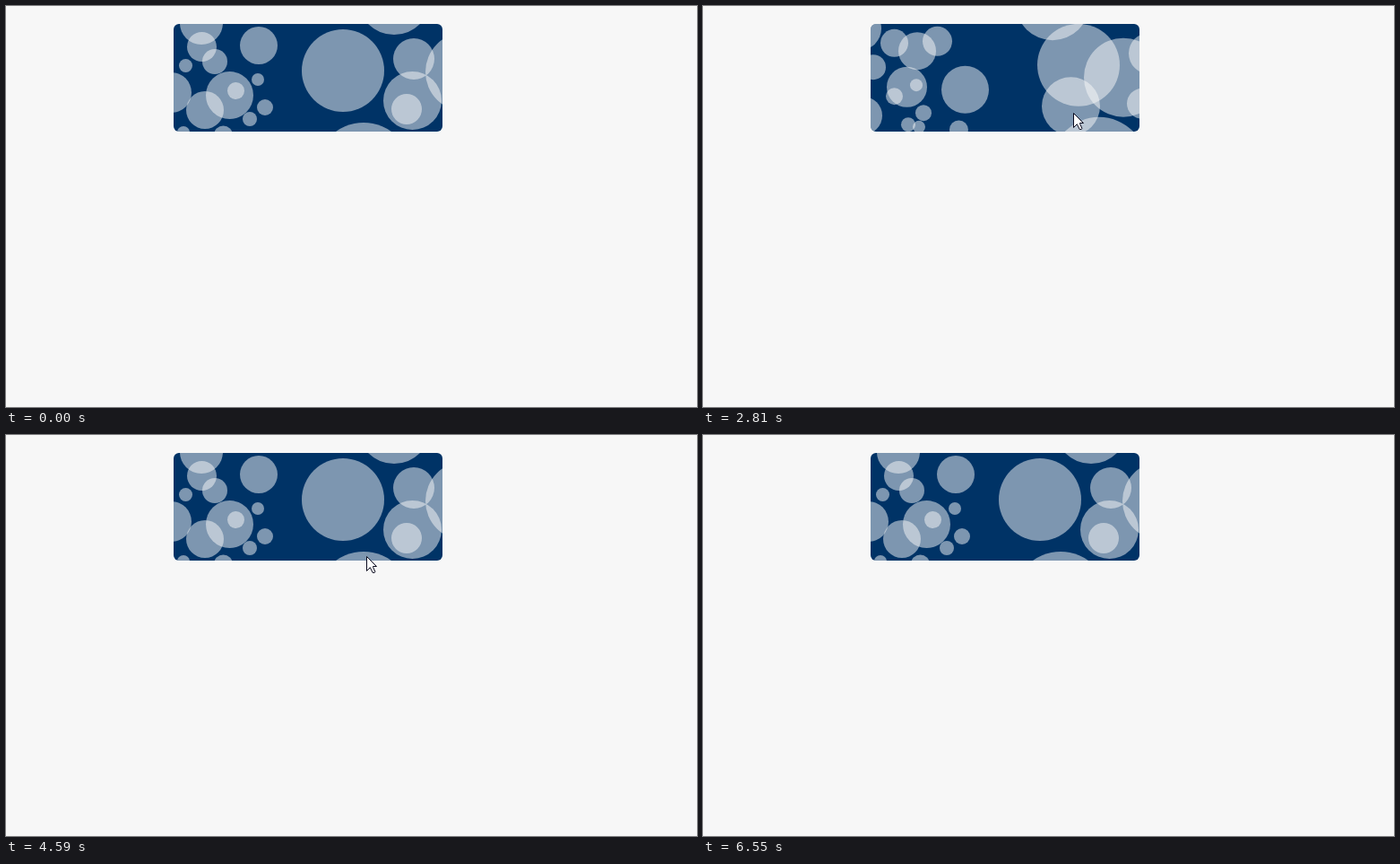
An HTML page for the animation above (6.86 s loop, 771 by 447 pixels).

```html
<!DOCTYPE html>
<html lang="en">
<head>
<meta charset="utf-8">
<title>Bubble button</title>
<style>
  html, body { margin: 0; width: 100%; height: 100%; overflow: hidden; background: #f7f7f7; }
  svg { display: block; }
</style>
</head>
<body>
<svg width="771" height="447" viewBox="0 0 771 447">
  <defs>
    <clipPath id="card"><rect x="187" y="20" width="300" height="120" rx="6"/></clipPath>
    <g id="bubbles" fill="#fafafa" fill-opacity=".5"></g>
  </defs>
  <rect width="771" height="447" fill="#f7f7f7"/>
  <rect x="187" y="20" width="300" height="120" rx="6" fill="#036"/>
  <g clip-path="url(#card)">
    <use id="falling" href="#bubbles"/>
    <use id="rising" href="#bubbles"/>
  </g>
  <path id="cursor" d="M.5 .5V16.5L4.3 12.7L7.2 18.5H9.2L9.9 17.3L7.5 12.2V11.5H11.5Z" fill="#fff" stroke="#0a0a1e"/>
</svg>
<script>
const LOOP = 6860;
const TRAVEL = 300;
const FADE = 1000;

// x, y, radius of the bubbles that shape the resting card
const MAIN_BUBBLES = [
  [433, -9, 41], [442, -114, 53], [419, -225, 46], [512, 73.5, 44], [453.5, 105.5, 32.5],
  [490, -182, 17], [516, -29, 27], [498, -238, 23], [534.5, -114, 23.5],
  [282, 44, 21], [218, 19, 24], [233, 62, 14], [281, 82, 7], [254, -40, 27],
  [292.5, -197.5, 26.5], [227.5, -200.5, 22.5], [200.5, 66.5, 7.5], [269, 0, 13],
  [241, -156, 7], [261.5, -251.5, 16.5], [222, 116, 21], [256.5, 94.5, 9.5],
  [289, 113, 9], [272, 126, 8], [213.5, -249.5, 15.5]
];

// small bubbles zigzag upwards above the card, wider ones on the left
const smallBubbles = Array.from({ length: 10 }, (_, n) => {
  const i = n + 1;
  const swing = Math.cos((i - 3) * (Math.PI + 0.35));
  return [250 + 46 * swing, -6 - 14.7 * i, 8.5 + 0.35 * i - 2 * swing];
});

// the picture refreshes evenly within each span: start, refreshes until the next span
const SPANS = [[0, 1], [580, 14], [2390, 8], [3510, 8], [4590, 4], [5100, 6], [6010, 4], [6550, 1]];

// pointer key points: time, x, y
const POINTER = [
  [580, 460, 280], [820, 459, 244], [1490, 464, 241], [1640, 452, 235], [2030, 414, 136],
  [2260, 413, 119], [3300, 413, 119], [3510, 413, 162], [3810, 408, 209], [4300, 408, 209],
  [4590, 402, 135], [4840, 401, 121], [5400, 401, 121], [5710, 430, 260], [6010, 528, 349]
];

// pointer enters and leaves the button
const HOVERS = [[2032, 3450], [4592, 5515]];

const byId = id => document.getElementById(id);
const falling = byId("falling"), rising = byId("rising"), cursor = byId("cursor");

for (const [cx, cy, r] of [...MAIN_BUBBLES, ...smallBubbles]) {
  const circle = document.createElementNS("http://www.w3.org/2000/svg", "circle");
  Object.entries({ cx, cy, r }).forEach(([key, value]) => circle.setAttribute(key, value));
  byId("bubbles").append(circle);
}

// the CSS "ease" curve
function ease(x) {
  if (x <= 0) return 0;
  if (x >= 1) return 1;
  let low = 0, high = 1;
  for (let i = 0; i < 30; i++) {
    const mid = (low + high) / 2;
    if (0.75 * mid * (1 - mid) + mid ** 3 < x) low = mid; else high = mid;
  }
  return 0.3 * low * (1 - low) ** 2 + 3 * low * low * (1 - low) + low ** 3;
}

function lastRefresh(time) {
  const k = SPANS.findLastIndex(([start]) => start <= time);
  const [start, count] = SPANS[k];
  const [end] = SPANS[k + 1] ?? [LOOP];
  const step = (end - start) / count;
  return start + Math.floor((time - start) / step) * step;
}

function shiftAt(t) {
  let shift = 0;
  for (const [enter, leave] of HOVERS) {
    const reached = ease((Math.min(t, leave) - enter) / FADE);
    shift += TRAVEL * reached * (1 - ease((t - leave) / FADE));
  }
  return shift;
}

function pointerAt(t) {
  const k = POINTER.findLastIndex(([start]) => start <= t);
  if (k < 0) return null;
  const [t0, x0, y0] = POINTER[k];
  if (k === POINTER.length - 1) return t > t0 ? null : [x0, y0];
  const [t1, x1, y1] = POINTER[k + 1];
  const p = (t - t0) / (t1 - t0);
  return [Math.round(x0 + (x1 - x0) * p), Math.round(y0 + (y1 - y0) * p)];
}

const move = (node, x, y) => node.setAttribute("transform", `translate(${x} ${y})`);

function draw(time) {
  const t = lastRefresh(time);
  const shift = shiftAt(t);
  move(falling, 0, shift);
  move(rising, -43, 297 - shift);

  const tip = pointerAt(t);
  cursor.style.display = tip ? "" : "none";
  if (tip) move(cursor, ...tip);
}

const begin = performance.now();
function frame() {
  draw((performance.now() - begin) % LOOP);
  requestAnimationFrame(frame);
}
frame();
</script>
</body>
</html>
```
